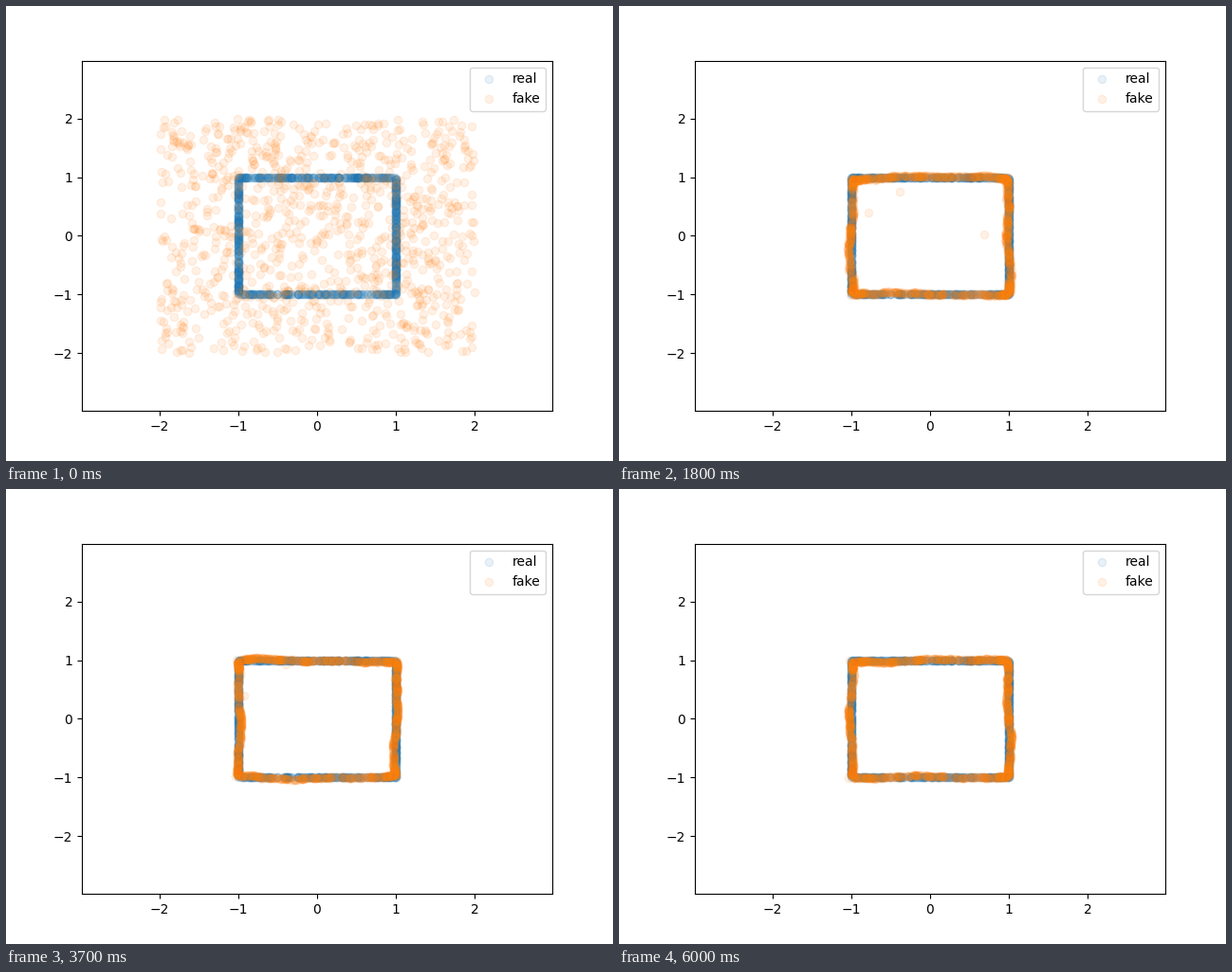
Recreate the animation shown at these times as a matplotlib script. Size 640 by 480 pixels, loop 6.1 s.

```python
import numpy as np
import matplotlib.pyplot as plt
from matplotlib.animation import FuncAnimation

FRAMES, INTERVAL = 61, 100
COUNT = 1000
LIMIT = 2.99
SPEED = 0.115     # units travelled per frame
INNER_RATIO = 0.7  # points inside the square travel slower
SOFT = 0.2        # softness of the arrival
CORNER = 0.97
SETTLE = 6        # frames until most points reach the outline

rng = np.random.default_rng(7)


def square_outline(n):
    """Random points on the outline of the square from -1 to 1."""
    along = rng.uniform(-1, 1, n)
    edge = rng.integers(0, 4, n)
    side = np.where(edge % 2, 1.0, -1.0)
    flat = edge < 2
    return np.column_stack([np.where(flat, along, side),
                            np.where(flat, side, along)])


def soft(x):
    return SOFT * np.logaddexp(0, x / SOFT)


real = square_outline(COUNT)
start = rng.uniform(-2, 2, (COUNT, 2))
# Three late arrivals inside the square
start[:3] = [(0.05, 0), (-0.4, 0.41), (-0.6, 0.4)]

# Each point heads for the nearest edge: one axis crosses it, one runs along.
rows = np.arange(COUNT)
normal = np.abs(start).argmax(axis=1)
tangent = 1 - normal
side = np.sign(start[rows, normal])
edge = 2 * normal + (side > 0)

at_corner = np.abs(start[rows, tangent]) > CORNER
goal = np.empty_like(start)
goal[rows, tangent] = np.clip(start[rows, tangent], -CORNER, CORNER)
goal[rows, normal] = side * np.where(at_corner, CORNER, 1.0)
offset = start - goal
dist = np.abs(offset)

inside = np.abs(start).max(axis=1) < 1
speed = SPEED * rng.uniform(0.96, 1.04, COUNT)
speed[inside] *= INNER_RATIO
speed[:3] = 0.04, 0.02, 0.015

slide = np.where(at_corner,
                 -np.sign(start[rows, tangent]) * rng.exponential(0.12, COUNT),
                 rng.normal(0, 0.03, COUNT))
noise = rng.normal(0, 1, (COUNT, 2))
phase = rng.uniform(0, 2 * np.pi, COUNT)


def edge_drift(along, t):
    """Slow outward waves that run along each edge."""
    wave = 0.02 * np.sin(2.6 * along + 0.13 * t + 1.7 * edge)
    wave += 0.012 * np.sin(6 * along - 0.19 * t + 2.3 * edge)
    wave += 0.006 * np.sin(17 * along + 0.3 * t + 0.9 * edge)
    return wave * min(t / 18, 1)


def fake_points(t):
    left = dist * soft(dist - speed[:, None] * t) / soft(dist)
    pos = goal + np.sign(offset) * left

    begun = min(t / SETTLE, 1)
    after = max(t - SETTLE, 0)
    spread = min(after / 20, 1)
    pos[rows, tangent] += slide * spread
    out = at_corner * (1 - CORNER) * 0.7 * spread
    out += edge_drift(pos[rows, tangent], t)
    out += 0.006 * np.sin(0.3 * t + phase) * begun
    pos[rows, normal] += side * out
    return pos + 0.022 * noise * begun * np.exp(-after / 9)


fig, ax = plt.subplots(figsize=(6.4, 4.8), dpi=100)
ax.scatter(*real.T, alpha=0.1, label="real")
fake = ax.scatter(*fake_points(0).T, alpha=0.1, label="fake")
ax.set(xlim=(-LIMIT, LIMIT), ylim=(-LIMIT, LIMIT))
ax.legend(loc="upper right")


def draw(i):
    fake.set_offsets(fake_points(i))
    return [fake]


anim = FuncAnimation(fig, draw, frames=FRAMES, interval=INTERVAL,
                     repeat=True, repeat_delay=0)
plt.show()
```
